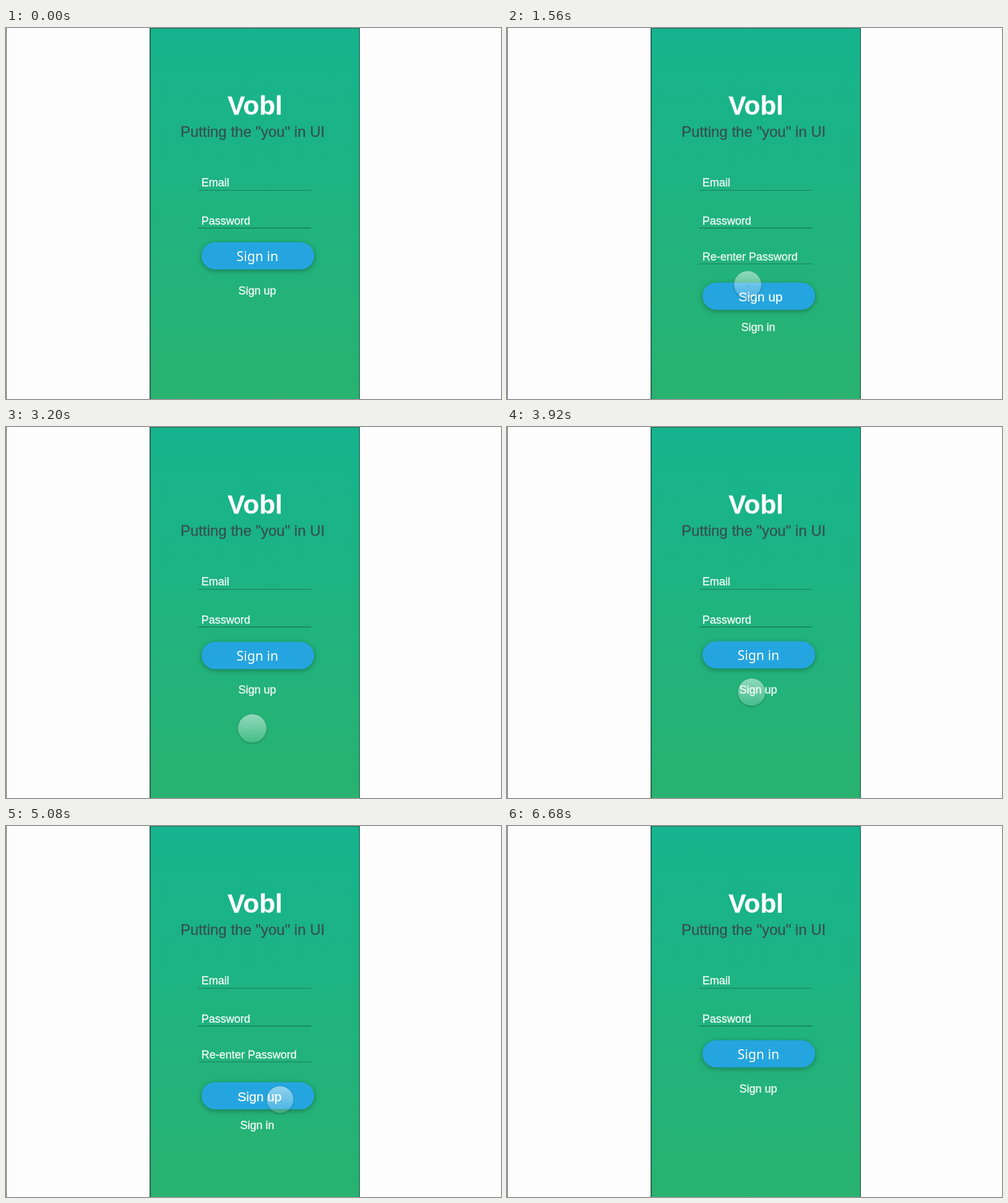
Write an HTML page with a canvas that moves like this. It is 800 by 600 pixels and loops after 6.76 s.

```html
<!DOCTYPE html>
<html lang="en">
<head>
<meta charset="utf-8">
<title>Sign in</title>
<style>
html, body { margin: 0; width: 100%; height: 100%; overflow: hidden; background: #fefdfe; }
canvas { display: block; }
</style>
</head>
<body>
<canvas id="stage" width="800" height="600"></canvas>
<script>
const ctx = document.getElementById('stage').getContext('2d');
const LOOP = 6760, STEP = 40, MORPH = 500;
const SANS = '"Liberation Sans", Arial, sans-serif';
const HUMANIST = '"Noto Sans", "Open Sans", sans-serif';

// Start of each form change and the state it leads to (1 = sign up).
const changes = [[1230, 1], [2825, 0], [4228, 1], [5760, 0]];

// Touch pointer: time, x, y, radius, sideways bulge on the way here.
const stops = [
  [560, 400, 626, 23, 0],
  [1150, 389, 415, 22, 0],
  [2080, 389, 415, 22, 0],
  [2640, 398, 487.5, 23, 0],
  [3480, 398, 487.5, 23, 0],
  [4040, 395, 423, 22, 0],
  [4800, 395, 423, 22, 0],
  [5500, 397, 484, 21, 56],
  [5940, 397, 484, 21, 0],
  [6420, 397, 626, 21, 0]
];

const clamp = v => Math.min(1, Math.max(0, v));
const mix = (a, b, u) => a + (b - a) * u;
const easeOut = u => 1 - (1 - u) ** 3;
const easeInOut = u => u < 0.5 ? 2 * u * u : 1 - 2 * (1 - u) ** 2;

function signUpAmount(t) {
  let p = 0;
  for (const [start, state] of changes) {
    if (t >= start) p = mix(1 - state, state, easeOut(clamp((t - start) / MORPH)));
  }
  return p;
}

function pointerAt(t) {
  const i = stops.findIndex(s => s[0] > t);
  if (i < 1) return null;
  const a = stops[i - 1], b = stops[i];
  const u = easeInOut((t - a[0]) / (b[0] - a[0]));
  return {
    x: mix(a[1], b[1], u) + b[4] * Math.sin(Math.PI * u),
    y: mix(a[2], b[2], u),
    r: mix(a[3], b[3], u)
  };
}

// A hairline stroke gives the labels their slightly heavy stems.
function text(str, x, y, size, { alpha = 1, color = '#fff', family = SANS, weight = 400, stem = 0.3 } = {}) {
  if (alpha <= 0) return;
  ctx.globalAlpha = alpha;
  ctx.fillStyle = ctx.strokeStyle = color;
  ctx.lineWidth = stem;
  ctx.font = `${weight} ${size}px ${family}`;
  ctx.fillText(str, x, y);
  if (stem) ctx.strokeText(str, x, y);
  ctx.globalAlpha = 1;
}

function field(label, baseline, lineY, lineColor, alpha = 1) {
  text(label, 315.8, baseline, 18, { alpha: 0.96 * alpha });
  ctx.globalAlpha = alpha;
  ctx.fillStyle = lineColor;
  ctx.fillRect(311, lineY, 182, 1);
  ctx.globalAlpha = 1;
}

function shadow(color, blur, y) {
  ctx.shadowColor = color;
  ctx.shadowBlur = blur;
  ctx.shadowOffsetY = y;
}

function panel() {
  ctx.fillStyle = '#fefdfe';
  ctx.fillRect(0, 0, 800, 600);
  ctx.fillStyle = '#58585a';
  ctx.fillRect(0, 0, 1, 600);
  const g = ctx.createLinearGradient(0, 0, 0, 600);
  g.addColorStop(0, '#15b48e');
  g.addColorStop(1, '#29b270');
  ctx.fillStyle = g;
  ctx.fillRect(232, 0, 340, 600);
  ctx.fillStyle = '#2a6653';
  ctx.fillRect(232, 0, 2, 600);
  ctx.fillRect(570.7, 0, 1.3, 600);
  ctx.fillRect(232, 0, 340, 1);
}

function button(p) {
  const y = mix(346.5, 414.3, p);
  ctx.save();
  shadow('rgba(0,0,0,0.32)', 9, 2);
  ctx.fillStyle = '#25a5df';
  ctx.beginPath();
  ctx.roundRect(316, y, 182, 44, 22);
  ctx.fill();
  ctx.restore();
  text('Sign in', 372.5, y + 30, 21.3, { alpha: 1 - p, family: HUMANIST, stem: 0 });
  text('Sign up', 374.3, y + 30.3, 21, { alpha: p });
}

function pointer({ x, y, r }) {
  const disc = () => {
    ctx.beginPath();
    ctx.arc(x, y, r, 0, Math.PI * 2);
  };
  // Soft rim shadow kept outside the translucent disc.
  ctx.save();
  ctx.beginPath();
  ctx.rect(0, 0, 800, 600);
  ctx.arc(x, y, r, 0, Math.PI * 2, true);
  ctx.clip('evenodd');
  shadow('rgba(0,0,0,0.3)', 3, 1);
  ctx.fillStyle = '#3a9a72';
  disc();
  ctx.fill();
  ctx.restore();

  const g = ctx.createLinearGradient(0, y - r, 0, y + r);
  g.addColorStop(0, 'rgba(255,255,255,0.5)');
  g.addColorStop(1, 'rgba(255,255,255,0.14)');
  ctx.fillStyle = g;
  disc();
  ctx.fill();
  ctx.fillStyle = 'rgba(30,90,70,0.8)';
  ctx.fillRect(Math.round(x + 1), Math.round(y + 2), 1, 1);
}

function draw(t) {
  const p = signUpAmount(t);
  const touch = pointerAt(t);
  panel();
  text('Vobl', 358, 140, 42.5, { weight: 700 });
  text('Putting the "you" in UI', 282, 176, 24, { color: '#37504d' });
  field('Email', 256, 262, '#20795b');
  field('Password', 318, 323, '#17654b');
  field('Re-enter Password', 375.5, 381, '#20795b', p);
  button(p);
  if (touch) pointer(touch);
  text('Sign up', 375.5, 431, 18, { alpha: 0.96 * (1 - p) });
  text('Sign in', 378.5, 490, 18, { alpha: 0.96 * p });
}

const origin = performance.now();
function tick() {
  const t = (performance.now() - origin) % LOOP;
  draw(Math.min(Math.floor(t / STEP) * STEP, LOOP - 2 * STEP));
  requestAnimationFrame(tick);
}
tick();
</script>
</body>
</html>
```
